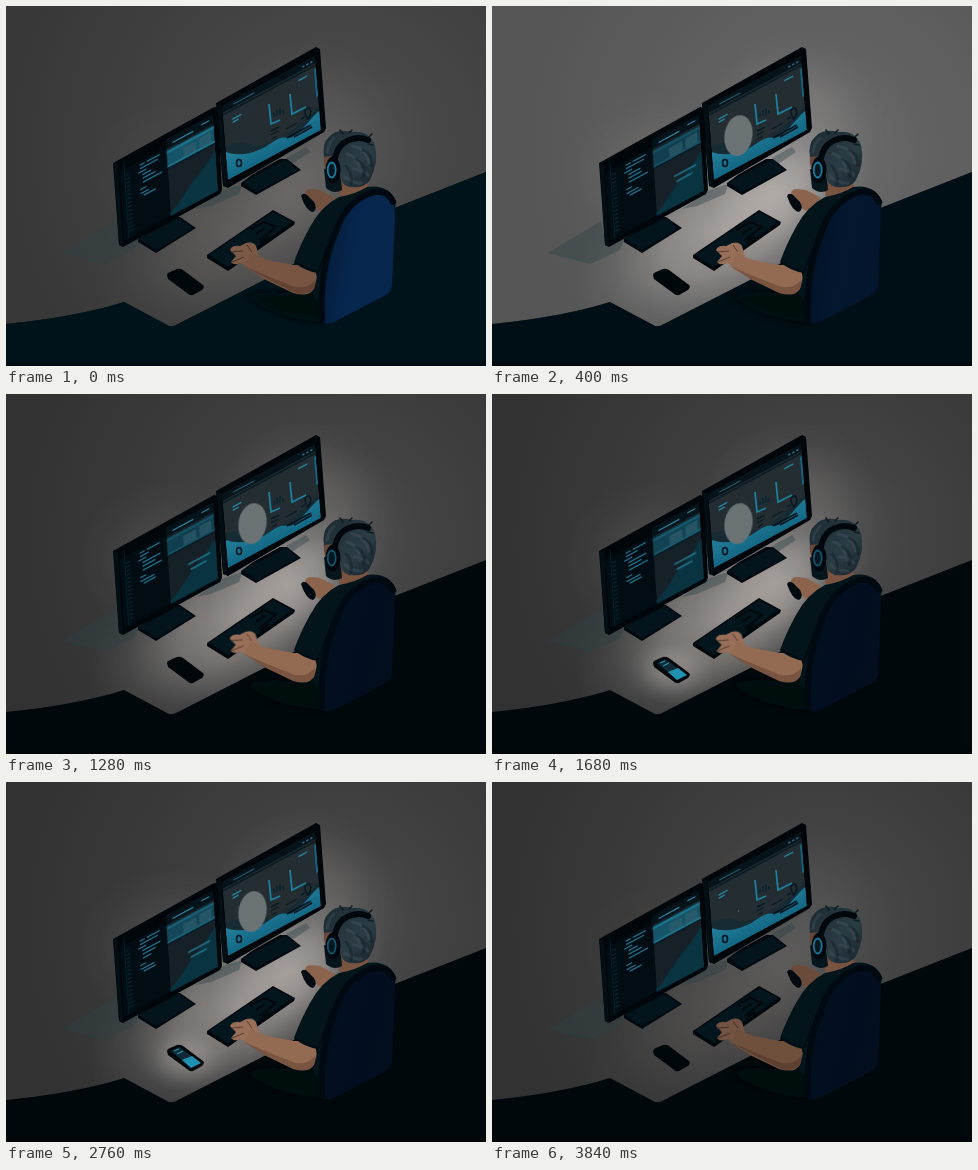
An HTML page that plays this animation: 480 by 360 pixels, repeating every 3.88 s.

```html
<!DOCTYPE html>
<html lang="en">
<head>
<meta charset="utf-8">
<title>Night desk</title>
<style>
html, body { margin: 0; width: 100%; height: 100%; overflow: hidden; background: #333; }
svg { display: block; width: 100vw; height: 100vh; }
.room, .glow, .floor, .chair, .phone, .halo, .mark, .ring, .dim, .pane, .note {
  animation: 3.88s linear infinite;
}
.room { animation-name: room; }
.glow { animation-name: glow; }
.floor { animation-name: floor; }
.chair { animation-name: chair; }
.phone { animation-name: phone; }
.halo { animation-name: halo; }
.mark { animation-name: mark; transform-origin: 246.5px 129px; }
.ring { animation-name: ring; }
.dim { animation-name: dim; }
.pane { animation-name: pane; }
.note { animation-name: note; }
.type { stroke-dasharray: 24; animation: type 3.88s linear infinite; }
.b { animation-delay: -1.3s; }
.c { animation-delay: -2.5s; }
.hand { animation: tap .388s ease-in-out infinite; }
@keyframes room { 0% { opacity: .03 } 10.3% { opacity: .17 } 15% { opacity: .04 } 28.9%, 100% { opacity: 0 } }
@keyframes glow { 0% { opacity: .32 } 10.3%, 73% { opacity: 1 } 87.6% { opacity: .5 } 99%, 100% { opacity: .22 } }
@keyframes floor { 0% { opacity: .8 } 10.3% { opacity: .5 } 28.9%, 100% { opacity: 0 } }
@keyframes chair { 0% { opacity: .9 } 10.3% { opacity: .3 } 28.9%, 100% { opacity: 0 } }
@keyframes phone { 0%, 36% { opacity: 0 } 43.3%, 89% { opacity: 1 } 98%, 100% { opacity: 0 } }
@keyframes halo { 0%, 36% { opacity: 0 } 43.3%, 73% { opacity: .6 } 87%, 100% { opacity: 0 } }
@keyframes mark { 0% { transform: scale(0) } 9.3%, 76% { transform: scale(1) } 87.6% { transform: scale(.53) } 99% { transform: scale(.04) } 100% { transform: scale(0) } }
@keyframes ring { 0%, 10.3% { stroke: #187da0 } 33%, 72% { stroke: #15536d } 100% { stroke: #187593 } }
@keyframes dim { 0% { opacity: .22 } 10.3%, 73% { opacity: 0 } 99%, 100% { opacity: .28 } }
@keyframes pane { 0% { opacity: .85 } 10.3%, 33% { opacity: .35 } 54%, 72% { opacity: .55 } 99%, 100% { opacity: .85 } }
@keyframes note { 0% { opacity: 0 } 8%, 88% { opacity: 1 } 98%, 100% { opacity: 0 } }
@keyframes type { 0% { stroke-dashoffset: 0 } 35% { stroke-dashoffset: 16 } 70%, 100% { stroke-dashoffset: 0 } }
@keyframes tap { 0%, 100% { transform: none } 50% { transform: translate(-.5px, 1px) } }
</style>
</head>
<body>
<svg viewBox="0 0 480 360" preserveAspectRatio="none">
  <defs>
    <radialGradient id="wall" gradientUnits="userSpaceOnUse" cx="330" cy="145" r="330">
      <stop offset="0" stop-color="#505050"/>
      <stop offset=".3" stop-color="#434242"/>
      <stop offset=".65" stop-color="#393939"/>
      <stop offset="1" stop-color="#323232"/>
    </radialGradient>
    <radialGradient id="lit">
      <stop offset="0" stop-color="#e4d9d2" stop-opacity=".5"/>
      <stop offset=".4" stop-color="#ddd4ce" stop-opacity=".34"/>
      <stop offset=".75" stop-color="#ccc" stop-opacity=".09"/>
      <stop offset="1" stop-color="#bbb" stop-opacity="0"/>
    </radialGradient>
    <linearGradient id="seat" x1="0" y1=".2" x2="1" y2=".6">
      <stop offset="0" stop-color="#000c14"/>
      <stop offset=".3" stop-color="#020f20"/>
      <stop offset="1" stop-color="#030e1e"/>
    </linearGradient>
    <linearGradient id="blue" x1="0" y1=".3" x2="1" y2=".6">
      <stop offset="0" stop-color="#041c38"/>
      <stop offset=".45" stop-color="#082a55"/>
      <stop offset="1" stop-color="#082a54"/>
    </linearGradient>
    <linearGradient id="wave" x1="0" y1="0" x2="0" y2="1">
      <stop offset="0" stop-color="#247f9b"/>
      <stop offset="1" stop-color="#126784"/>
    </linearGradient>
    <linearGradient id="hair" x1="0" y1="0" x2="1" y2="1">
      <stop offset="0" stop-color="#1c2a31"/>
      <stop offset=".6" stop-color="#2c3c45"/>
      <stop offset="1" stop-color="#16222a"/>
    </linearGradient>
    <filter id="soft" x="-20%" y="-20%" width="140%" height="140%"><feGaussianBlur stdDeviation="3"/></filter>
    <clipPath id="s1"><path d="M0 0H94V76H0Z"/></clipPath>
    <clipPath id="s2"><path d="M0 0H93V74H0Z"/></clipPath>
    <path id="ground" d="M0 318Q70 311 118 296L163 320Q167 321 172 318L264 271L386 203L480 166V360H0Z"/>
    <path id="back" d="M316 316Q315 266 331 226Q341 198 363 189Q389 183 389 210L386 280Q385 286 378 290L330 315Q321 319 316 316Z"/>
    <path id="palm" d="M224 244Q226 239 234 240L240 237Q247 235 250 240L253 250L242 260L235 257Q228 260 225 256L230 250Z"/>
    <path id="arm" d="M245 247Q253 252 266 255L288 259L307 259Q314 275 308 283Q302 290 289 287L263 274L238 260Z"/>
    <path id="grip" d="M299 187Q300 183 305 183L314 184L329 192L323 205Q314 207 309 201L305 193L300 191Z"/>
  </defs>

  <!-- room -->
  <path fill="url(#wall)" d="M0 0H480V360H0Z"/>
  <path class="room" fill="#fff" d="M0 0H480V360H0Z"/>
  <g class="glow" fill="url(#lit)">
    <ellipse cx="232" cy="224" rx="165" ry="92" transform="rotate(-30 232 224)"/>
    <ellipse cx="282" cy="190" rx="85" ry="62" transform="rotate(-30 282 190)" opacity=".75"/>
    <ellipse cx="300" cy="122" rx="95" ry="100" opacity=".4"/>
    <ellipse cx="165" cy="165" rx="100" ry="85" opacity=".2"/>
  </g>
  <ellipse class="halo" cx="180" cy="276" rx="45" ry="34" fill="url(#lit)"/>

  <!-- shadows -->
  <g fill="#2d4146" opacity=".4">
    <path d="M56 247L109 215L114 241L133 232L128 244L98 258Z"/>
    <path d="M190 203L218 184L236 178L233 188L205 200Z"/>
    <path d="M280 152L300 141L304 146L286 158Z"/>
  </g>

  <use href="#ground" fill="#00080c"/>
  <use href="#ground" class="floor" fill="#00161f"/>
  <path d="M0 356H480V360H0Z" opacity=".3"/>

  <!-- left monitor -->
  <path d="M132 233L147 224L168 211L174 211L190 222L150 247L132 236Z" fill="#01090f"/>
  <path d="M133 233L173 212L187 222L150 244Z" fill="#04141d"/>
  <path d="M107 157L208 101L212 102L216 184L214 188L117 241L113 239Z" fill="#00060a"/>
  <path d="M108 157L113 239L117 240L112 158Z" fill="#030f15"/>
  <g transform="matrix(1 -.537 .065 1 113 159)" clip-path="url(#s1)">
    <path d="M0 0H94V76H0Z" fill="#010c13"/>
    <path d="M0 0H94V7H0Z" fill="#000609"/>
    <path d="M5 0V76" stroke="#05202a" stroke-width="1"/>
    <path d="M8 13V70" stroke="#0c2d39" stroke-width="4" stroke-dasharray="1 3"/>
    <g fill="none" stroke="#1c6d87" stroke-width="1.4">
      <path d="M20 11h5m2 0h13M18 18h8M22 25h13M19 35h6M22 42h12"/>
      <path class="type" d="M20 14.5h18"/>
      <path class="type b" d="M22 21.5h18"/>
      <path class="type c" d="M22 29h19"/>
      <path class="type b" d="M19 39h14"/>
    </g>
    <path d="M47 0H94V76H47Z" fill="#152127"/>
    <path d="M47 0H94V9H47Z" fill="#04121a"/>
    <path d="M53 6H74M82 4H90" stroke="#2a7f98" stroke-width="1.3"/>
    <path d="M47 11H94V28H47Z" fill="#0e303d"/>
    <path class="pane" d="M47 11H94V28H47Z" fill="#175a70"/>
    <path class="pane" d="M47 13H94M47 27H94" stroke="#2489a5" stroke-width="1.6"/>
    <path d="M63 17H76V26H63ZM79 16H91V26H79Z" fill="#35616f" opacity=".6"/>
    <path d="M47 29H94" stroke="#041a25" stroke-width="1.5"/>
    <path id="hill" d="M47 73Q56 68 63 61T77 50T94 36V76H47Z" fill="#0b3442"/>
    <use href="#hill" class="pane" opacity=".5"/>
    <path class="note" d="M66 47H88M68 53H84" stroke="#247e98" stroke-width="1.3"/>
  </g>

  <!-- right monitor -->
  <path d="M235 177L247 168L274 153L281 153L295 164L250 189L235 180Z" fill="#01090f"/>
  <path d="M237 176L280 154L292 164L250 186Z" fill="#04141d"/>
  <path d="M210 97L310 41L314 43L320 122L318 126L222 182L217 180Z" fill="#00060a"/>
  <path d="M211 98L217 179L221 180L215 99Z" fill="#030f15"/>
  <g transform="matrix(1 -.537 .08 1 216 100)" clip-path="url(#s2)">
    <path d="M0 0H93V74H0Z" fill="#232d32"/>
    <path d="M0 0H93V7H0Z" fill="#06131a"/>
    <path d="M0 9H93" stroke="#0b1d25" stroke-width="2"/>
    <path d="M11 4H32" stroke="#205a6b" stroke-width="1.2"/>
    <path d="M80 4h2m2 0h2m2 0h2" stroke="#2b7b94" stroke-width="1.5"/>
    <path d="M9 18H18M9 21H15M75 15H84" stroke="#26839f" stroke-width="1.5"/>
    <path d="M0 40Q12 41 22 50T45 60T70 58T93 50V74H0Z" fill="#0c2b36" opacity=".5"/>
    <path d="M0 46Q10 55 22 59T44 61T60 64T78 62T93 55V74H0Z" fill="url(#wave)"/>
    <path d="M92 12V40" stroke="#17617a" stroke-width="2"/>
  </g>
  <path d="M263 98L265 118L274 114M284 88L286 108L300 101" fill="none" stroke="#1e7e9b" stroke-width="1.8"/>
  <path d="M268 111V107M271 110V104M274 109V102M277 108V104" stroke="#0c2730" stroke-width="2"/>
  <path d="M265 125L273 121M265 129L272 125M266 133L271 130M280 123L291 117M295 113L299 111" stroke="#0b1b22" stroke-width="1.4"/>
  <path d="M281 132L305 119M288 131L306 121" stroke="#03131b" stroke-width="1.5"/>
  <path d="M302 113Q297 106 300 103Q304 100 305 106Q304 111 302 113Z" fill="none" stroke="#061923" stroke-width="1.5"/>
  <ellipse cx="233" cy="157" rx="2.5" ry="3.5" fill="none" stroke="#02131b" stroke-width="1.5"/>
  <g class="mark"><ellipse cx="246.5" cy="129.5" rx="14" ry="20.5" transform="rotate(9 246.5 129.5)" fill="#6c7375"/></g>

  <!-- keyboard, mouse, phone -->
  <path d="M201 249L267 204L289 216L288 219L222 265L201 252Z" fill="#00070b"/>
  <path d="M203 249L267 206L286 216L222 261Z" fill="#03151d"/>
  <path d="M244 224L258 216L270 221L253 234M250 228L259 222M254 237L263 230" fill="none" stroke="#000508" stroke-width="1.7"/>
  <path d="M161 269Q161 267 164 266L171 263Q174 262 177 264L197 279Q199 281 196 284L187 289Q184 290 181 287L162 273Z" fill="#00070b"/>
  <g class="phone">
    <path d="M165 269L173 265L195 281L185 286Z" fill="#0d2a36"/>
    <path d="M176 278L186 274L195 281L185 286Z" fill="#2191b1"/>
    <path d="M168 269L173 267M171 272L177 269" stroke="#2c8eaa" stroke-width="1.2"/>
  </g>

  <!-- person -->
  <use href="#grip" fill="#8c644d"/>
  <use href="#grip" class="dim" fill="#160e0a"/>
  <path d="M295 190Q297 186 301 189L308 196Q312 203 307 206Q300 205 295 190Z" fill="#000a10"/>
  <path d="M240 290Q258 284 283 287L319 282V316Q270 314 240 290Z" fill="#00080d" filter="url(#soft)"/>
  <g class="hand">
    <use href="#palm" fill="#98705a"/>
    <path d="M225 246L237 245M226 256L238 251M241 239L246 246" fill="none" stroke="#573b2f" stroke-width="1"/>
    <use href="#palm" class="dim" fill="#160e0a"/>
  </g>
  <use href="#arm" fill="#936a52"/>
  <path d="M238 260L264 271L289 281Q302 283 309 274Q311 281 304 287Q298 290 287 287L260 274Z" fill="#795441"/>
  <use href="#arm" class="dim" fill="#160e0a"/>
  <path d="M332 176L360 174L365 190L334 194Z" fill="#795441"/>
  <path d="M333 191Q350 188 361 181Q383 178 390 196L382 255L325 312L307 288L312 267Q298 265 288 256Q294 239 304 221Q315 200 333 191Z" fill="#03141b"/>
  <path d="M289 256Q300 262 312 266L329 222" fill="none" stroke="#000a10" stroke-width="1.5"/>

  <use href="#back" fill="url(#seat)"/>
  <use href="#back" class="chair" fill="url(#blue)"/>
  <path d="M316 316Q313 264 330 225Q340 196 365 187Q382 182 388 198" fill="none" stroke="#00090f" stroke-width="6"/>

  <path d="M320 140Q316 153 319 162L321 181Q326 188 336 183L341 151Z" fill="#68483a"/>
  <path d="M318 163L320 182Q328 189 336 184L334 166Z" fill="#07151c"/>
  <path d="M318 151Q316 137 323 131Q331 122 346 126Q363 124 369 139Q373 157 364 174Q358 183 343 181Q334 179 334 166L329 150Z" fill="url(#hair)"/>
  <g fill="none" stroke-linecap="round">
    <path d="M346 140Q360 142 363 157M341 148Q353 151 354 166M348 163Q358 164 362 169M339 171Q347 178 356 177M328 132Q322 138 321 146" stroke="#566a74" stroke-width="3" opacity=".25"/>
    <path d="M340 160Q347 168 345 178M357 144Q367 149 366 160M350 153Q362 160 357 171" stroke="#0d1a21" stroke-width="3" opacity=".4"/>
    <path d="M337 128L334 124M343 127L346 124M362 138L367 139M363 131L366 128" stroke="#101c22" stroke-width="1.6"/>
    <path d="M328 158Q330 139 343 134Q353 130 362 134" stroke="#00080d" stroke-width="6"/>
  </g>
  <ellipse cx="327" cy="164" rx="7.5" ry="13.5" fill="#00080d"/>
  <ellipse class="ring" cx="325.7" cy="164" rx="4" ry="7.5" fill="#06171f" stroke="#187da0" stroke-width="1.8"/>
</svg>
</body>
</html>
```
